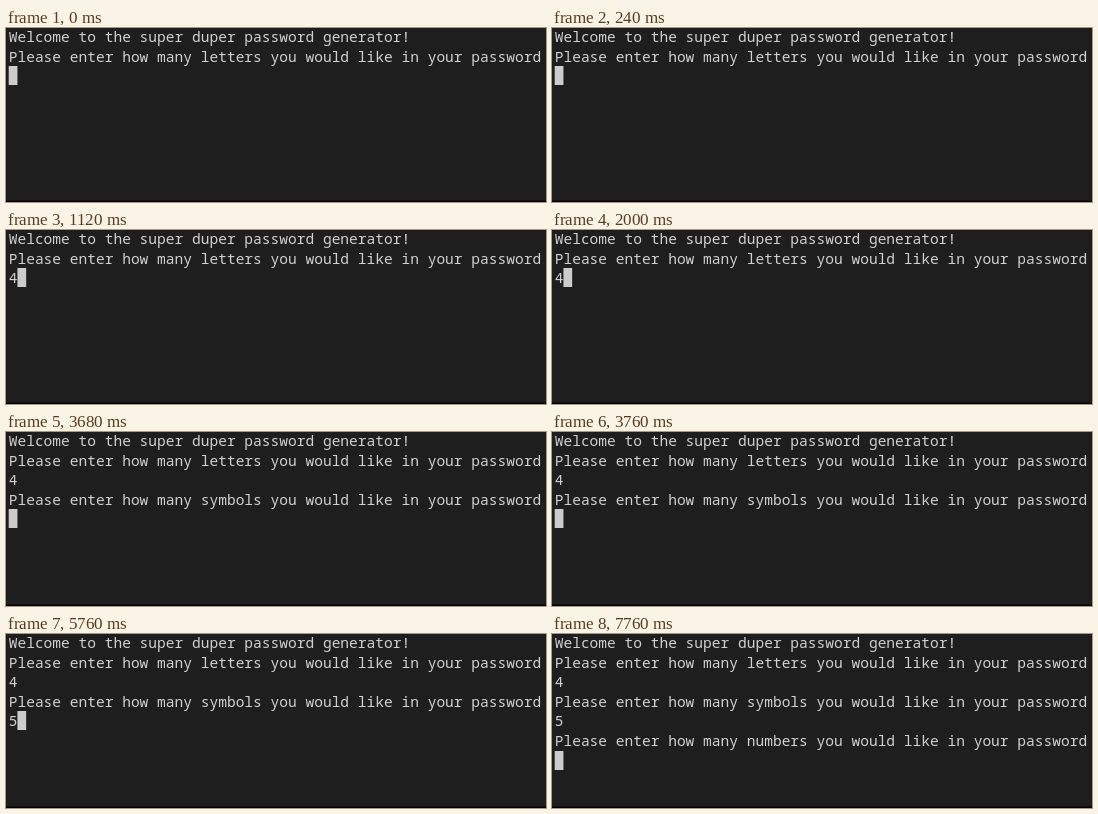
Write an HTML page with a canvas that moves like this. It is 540 px wide and 174 px high and loops after 8000 ms.

```html
<!DOCTYPE html>
<html lang="en">
<head>
<meta charset="utf-8">
<style>
  html, body { margin: 0; width: 100%; height: 100%; overflow: hidden; background: #1e1e1e; }
  canvas { display: block; }
</style>
</head>
<body>
<canvas width="540" height="174"></canvas>
<script>
const ctx = document.querySelector("canvas").getContext("2d");
const LOOP = 8000, LEFT = 2.7, TOP = -1, CELL = 8.73, ROW = 19.6;
const ask = what => `Please enter how many ${what} you would like in your password\n`;

// Terminal output, each piece with the time it appears
const output = [
  [0, "Welcome to the super duper password generator!\n" + ask("letters")],
  [1120, "4"],
  [3680, "\n" + ask("symbols")],
  [5760, "5"],
  [7760, "\n" + ask("numbers")],
];

function draw(t) {
  const lines = output.filter(([at]) => t >= at).map(([, text]) => text).join("").split("\n");
  const last = lines.length - 1;

  ctx.fillStyle = "#1e1e1e";
  ctx.fillRect(0, 0, 540, 174);
  ctx.fillStyle = "#000";
  ctx.fillRect(0, 172.6, 540, 1.4);

  ctx.fillStyle = "#d0d0d0";
  ctx.font = `${CELL / 0.6}px "Noto Sans Mono", "DejaVu Sans Mono", monospace`;
  lines.forEach((line, i) => ctx.fillText(line, LEFT, TOP + i * ROW + 14.9));

  ctx.fillStyle = "#cccccc";
  ctx.fillRect(LEFT + lines[last].length * CELL, Math.round(TOP + last * ROW), CELL, 19);
}

const start = performance.now();
function tick() {
  draw((performance.now() - start) % LOOP);
  requestAnimationFrame(tick);
}
tick();
</script>
</body>
</html>
```
